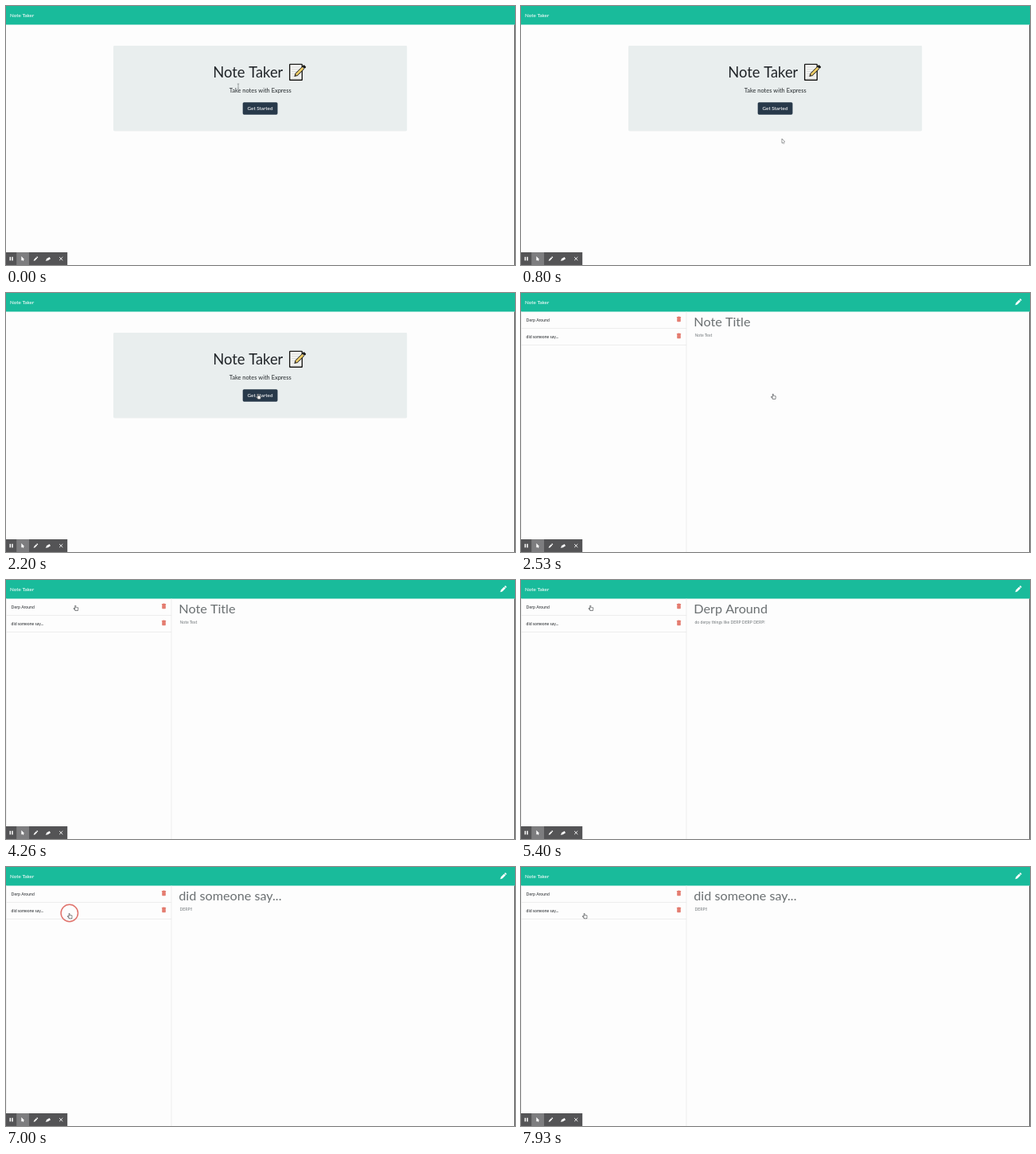
Animation, 640 px wide and 326 px high, one loop 8000 ms. Source, as an HTML page with a canvas:

```html
<!DOCTYPE html>
<html lang="en">
<head>
<meta charset="utf-8">
<title>Note Taker</title>
<style>
  html, body { margin: 0; width: 100%; height: 100%; overflow: hidden; background: #fdfdfd; }
  canvas { display: block; width: 640px; height: 326px; }
</style>
</head>
<body>
<canvas id="stage"></canvas>
<script>
const W = 640, H = 326, LOOP = 8000, HEADER = 23.6;
const OPEN_PAGE = 2530, RING_TIME = 330;
const canvas = document.getElementById('stage');
const ctx = canvas.getContext('2d');
const dpr = window.devicePixelRatio || 1;
canvas.width = W * dpr;
canvas.height = H * dpr;

// Places the pointer rests at, and the moves between them
const START = { x: 292, y: 101 };
const MOVES = [
  { from: 60, to: 500, x: 328, y: 167 },
  { from: 900, to: 1400, x: 315, y: 130.3 },
  { from: 1800, to: 1870, x: 317, y: 126.7 },
  { from: 3000, to: 3060, x: 190, y: 73 },
  { from: 3460, to: 4200, x: 87.5, y: 31.7 },
  { from: 5480, to: 5980, x: 79.8, y: 58 }
];
const CLICKS = [1870, 4600, 6930];

const NOTES = [
  { from: OPEN_PAGE, title: 'Note Title', text: 'Note Text' },
  { from: CLICKS[1], title: 'Derp Around', text: 'do derpy things like DERP DERP DERP!' },
  { from: CLICKS[2], title: 'did someone say...', text: 'DERP!!' }
];

function rect(x, y, w, h, color, r = 0) {
  ctx.fillStyle = color;
  ctx.beginPath();
  ctx.roundRect(x, y, w, h, r);
  ctx.fill();
}

function line(x1, y1, x2, y2, color, width, cap = 'butt') {
  ctx.beginPath();
  ctx.moveTo(x1, y1);
  ctx.lineTo(x2, y2);
  ctx.strokeStyle = color;
  ctx.lineWidth = width;
  ctx.lineCap = cap;
  ctx.stroke();
}

function text(str, x, y, size, color, align = 'left', weight = 400) {
  ctx.font = `${weight} ${size}px Lato, sans-serif`;
  ctx.textAlign = align;
  ctx.fillStyle = color;
  ctx.fillText(str, x, y);
}

// Pencil pointing down-left, in units of its own width
function pencil(x, y, width, length, body, end, tip) {
  ctx.save();
  ctx.translate(x, y);
  ctx.rotate(Math.PI / 4);
  ctx.scale(width, width);
  const half = length / 2;
  rect(-0.5, -half, 1, 0.65, end, 0.2);
  rect(-0.5, 0.85 - half, 1, length - 1.7, body);
  ctx.beginPath();
  ctx.moveTo(-0.5, half - 0.85);
  ctx.lineTo(0.5, half - 0.85);
  ctx.lineTo(0, half);
  ctx.fillStyle = tip;
  ctx.fill();
  ctx.restore();
}

function memo() {
  const ink = '#1c1c1a';
  rect(356, 72.7, 17, 21.2, ink, 1.2);
  rect(357.4, 74.1, 14.2, 18.4, '#f8f8f5', 0.4);
  for (let y = 77; y < 91; y += 2.8) line(359.2, y, 369.8, y, '#c9cbca', 0.7);
  pencil(369.2, 82.2, 4.2, 4.6, ink, ink, ink);
  pencil(369.1, 82.3, 2.7, 6.2, '#f3cf68', ink, '#6a5a3c');
}

function homePage() {
  rect(135, 50, 369.2, 107.5, '#e9eeee', 1.4);
  text('Note Taker', 260.2, 89.8, 18.4, '#212529');
  memo();
  text('Take notes with Express', 319.7, 108.7, 7.45, '#24292c', 'center');
  rect(297.7, 121.2, 43.8, 15.5, '#28394a', 1.6);
  text('Get Started', 319.5, 131.2, 6.3, '#fff', 'center', 500);
}

function trash(x, y) {
  rect(x, y + 0.5, 5.4, 0.9, '#e27568', 0.3);
  rect(x + 1.7, y, 2, 0.8, '#e27568', 0.3);
  rect(x + 0.4, y + 1.3, 4.6, 5.3, '#e47d71', 0.6);
}

function notesPage(t) {
  const edge = '#e8e9e9', row = 21;
  rect(0, HEADER, 0.7, H, edge);
  rect(207.6, HEADER, 0.8, H, edge);
  ['Derp Around', 'did someone say...'].forEach((name, i) => {
    const y = 23 + i * row;
    rect(0, y + row, 208, 0.8, edge);
    text(name, 6.6, y + 12.5, 5.1, '#212529');
    trash(195.8, y + 6.6);
  });
  const note = NOTES.filter(n => t >= n.from).pop();
  text(note.title, 217.3, 41.8, 16.2, '#6b7072');
  text(note.text, 218.5, 54.9, 5.1, '#71777a');
  pencil(625.1, 11.6, 2.6, 4, '#fff', '#fff', '#fff');
}

function toolbar() {
  const y = 318.1;
  rect(0, 310, 77.2, 16, '#545456');
  rect(13.2, 310, 15.8, 16, '#7d7d7f');
  for (const x of [5.3, 8]) line(x, y - 2.3, x, y + 2.3, '#fff', 1.5);
  arrow(19.3, y - 3.1, '#fff');
  pencil(37.2, y + 0.2, 1.8, 4, '#fff', '#fff', '#fff');
  line(51.3, y + 1.4, 55.4, y - 0.9, '#fff', 2.6);
  line(50.2, y + 2.5, 52.5, y + 1, '#fff', 1.2);
  for (const d of [-2.1, 2.1]) line(69.2 - d, y - 2.1, 69.2 + d, y + 2.1, '#fff', 0.9);
}

function arrow(x, y, fill, outline) {
  if (outline) line(x + 1.5, y + 3.5, x + 2.7, y + 6.2, outline, 1.6);
  ctx.beginPath();
  ctx.moveTo(x, y);
  ctx.lineTo(x, y + 5.4);
  ctx.lineTo(x + 3.8, y + 3.9);
  ctx.closePath();
  ctx.fillStyle = fill;
  ctx.fill();
  if (outline) {
    ctx.strokeStyle = outline;
    ctx.lineWidth = 0.6;
    ctx.stroke();
  }
  line(x + 1.4, y + 3.4, x + 2.6, y + 6, fill, 0.9);
}

// Outline pass first, then the white fill inside it
function hand(x, y) {
  for (const [color, grow] of [['#66696b', 0.35], ['#fff', -0.35]]) {
    const g = grow * 2;
    line(x - 0.2, y + 0.9, x - 0.2, y + 4, color, 1.1 + g, 'round');
    line(x - 1.9, y + 4.1, x - 0.3, y + 5.6, color, 1.1 + g, 'round');
    rect(x - 0.8 - grow, y + 2.8 - grow, 4 + g, 4.1 + g, color, 1.1);
  }
}

function beam(x, y) {
  line(x, y - 3, x, y + 3, '#777b7c', 0.7);
  for (const d of [-3, 3]) line(x - 1.2, y + d, x + 1.2, y + d, '#777b7c', 0.6);
}

function pointerAt(t) {
  let { x, y } = START;
  for (const m of MOVES) {
    const u = Math.min(1, Math.max(0, (t - m.from) / (m.to - m.from)));
    const k = u * u * (3 - 2 * u);
    x += (m.x - x) * k;
    y += (m.y - y) * k;
  }
  return [x, y];
}

function inside(x, y, left, top, right, bottom) {
  return x >= left && x <= right && y >= top && y <= bottom;
}

function pointer(t, x, y) {
  const home = t < OPEN_PAGE;
  const onLink = home ? inside(x, y, 298, 121, 341, 137)
    : t < MOVES[3].from || inside(x, y, 0, HEADER, 208, 66);
  if (onLink) hand(x, y);
  else if (home && inside(x, y, 281, 99, 359, 111)) beam(x, y);
  else arrow(x, y, '#fff', '#55585a');
}

function ring(x, y) {
  ctx.beginPath();
  ctx.arc(x, y, 10.7, 0, Math.PI * 2);
  ctx.strokeStyle = '#e0736c';
  ctx.lineWidth = 1.5;
  ctx.stroke();
}

function draw(t) {
  const [x, y] = pointerAt(t);
  ctx.setTransform(dpr, 0, 0, dpr, 0, 0);
  rect(0, 0, W, H, '#fdfdfd');
  rect(0, 0, W, HEADER, '#19bb9b');
  text('Note Taker', 5.1, 13.9, 6.25, '#fff', 'left', 500);
  if (t < OPEN_PAGE) homePage();
  else notesPage(t);
  toolbar();
  rect(639.2, HEADER, 0.8, H, '#333');
  if (CLICKS.some(c => t >= c && t < c + RING_TIME)) ring(x, y);
  pointer(t, x, y);
}

const start = performance.now();
function tick() {
  draw((performance.now() - start) % LOOP);
  requestAnimationFrame(tick);
}
tick();
</script>
</body>
</html>
```
